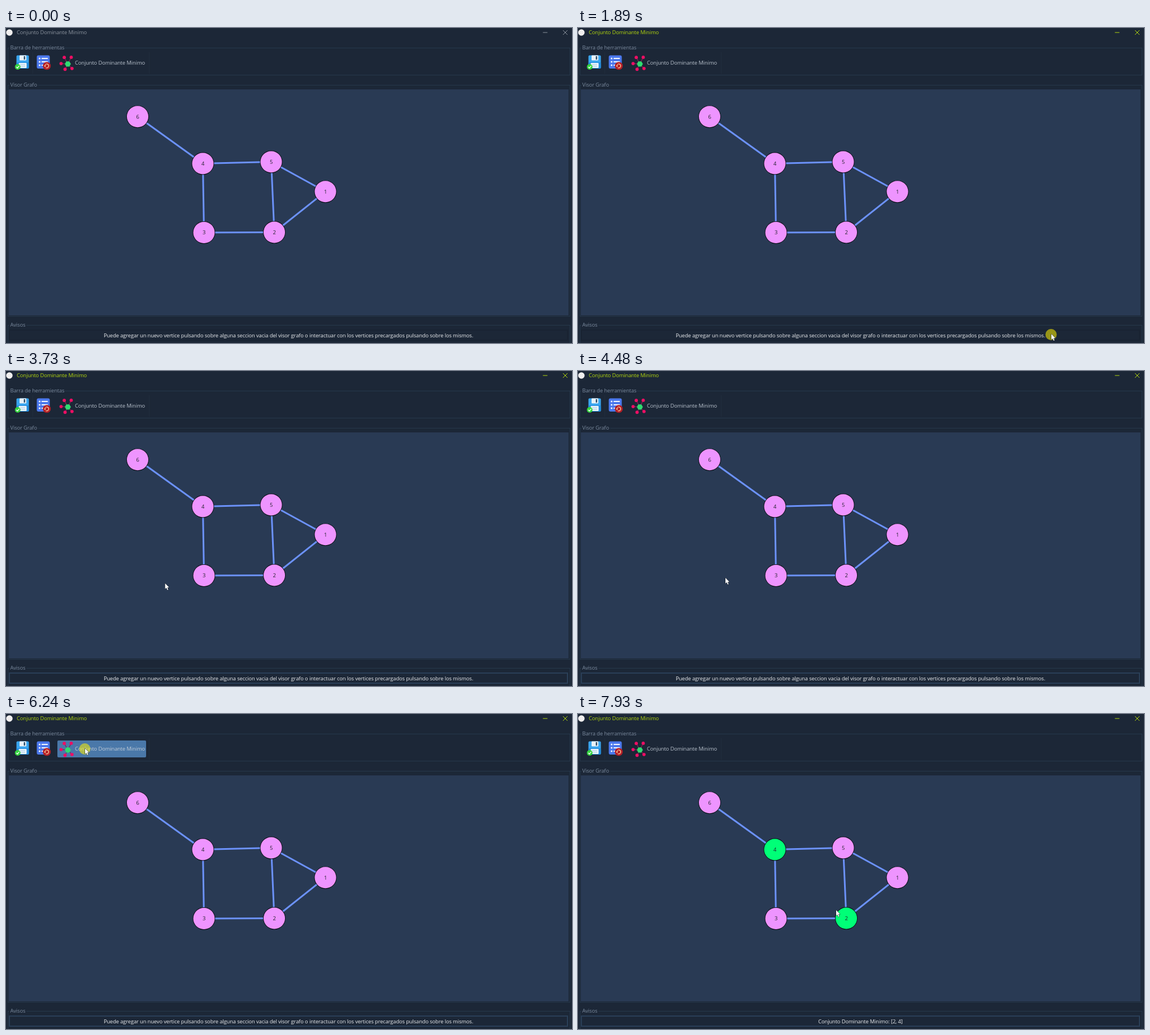
Recreate the animation shown at these times as an HTML page with a canvas. Size 1002 px wide and 559 px high, loop 8 s.

```html
<!DOCTYPE html>
<html lang="es">
<head>
<meta charset="utf-8">
<title>Conjunto Dominante Minimo</title>
<style>
  html, body { margin: 0; width: 100%; height: 100%; overflow: hidden; background: #1c2737; }
  canvas { display: block; width: 1002px; height: 559px; }
</style>
</head>
<body>
<canvas id="stage" width="1002" height="559"></canvas>
<script>
const ctx = document.getElementById('stage').getContext('2d');
const LOOP = 8000, STEP = 70;
const BG = '#1c2737', LINE = '#26384b', LABEL = '#7b8b9f';
const NAME = 'Conjunto Dominante Minimo';
const HINT = 'Puede agregar un nuevo vertice pulsando sobre alguna seccion vacia del visor grafo ' +
  'o interactuar con los vertices precargados pulsando sobre los mismos.';

const nodes = {
  1: [565.5, 290.3], 2: [475, 362.5], 3: [350.5, 363],
  4: [348.5, 240.5], 5: [469.5, 237.5], 6: [233, 157.3]
};
const edges = ['64', '45', '43', '32', '25', '51', '21'];

const home = [797, 566];
const moves = [
  { from: 380, to: 870, end: [618, 281] },
  { from: 1060, to: 1760, end: [838, 543] },
  { from: 2550, to: 3040, end: [211, 532] },
  { from: 3040, to: 3330, end: [206, 543] },
  { from: 3460, to: 3870, end: [352, 222] },
  { from: 4140, to: 4480, end: [261, 367] },
  { from: 4480, to: 4970, end: [206, 391] },
  { from: 4970, to: 5780, end: [140, 61] },
  { from: 6700, to: 6980, end: [352, 189] },
  { from: 6980, to: 7250, end: [341, 241] },
  { from: 7510, to: 7930, end: [457, 348] }
];

const ease = k => k * k * (3 - 2 * k);

function pointerAt(t) {
  let pos = home;
  for (const { from, to, end } of moves) {
    if (t < from) break;
    const held = Math.floor((t - from) / STEP) * STEP;
    const k = t >= to ? 1 : ease(held / (to - from));
    pos = pos.map((p, i) => p + (end[i] - p) * k);
  }
  return pos;
}

function text(str, x, y, color, align = 'left') {
  ctx.font = '9.4px "Open Sans", "Noto Sans", sans-serif';
  ctx.letterSpacing = '-0.13px';
  ctx.textAlign = align;
  ctx.textBaseline = 'alphabetic';
  ctx.fillStyle = color;
  ctx.fillText(str, x, y + 3.3);
}

function poly(points, color, width) {
  ctx.beginPath();
  points.forEach(([x, y]) => ctx.lineTo(x, y));
  if (width) {
    ctx.strokeStyle = color;
    ctx.lineWidth = width;
    ctx.stroke();
  } else {
    ctx.fillStyle = color;
    ctx.fill();
  }
}

const line = (x0, y0, x1, y1, color, width = 1) => poly([[x0, y0], [x1, y1]], color, width);

function disc(x, y, r, color) {
  ctx.beginPath();
  ctx.arc(x, y, r, 0, Math.PI * 2);
  ctx.fillStyle = color;
  ctx.fill();
}

function box(x, y, w, h, r, color) {
  ctx.beginPath();
  ctx.roundRect(x, y, w, h, r);
  ctx.fillStyle = color;
  ctx.fill();
}

function frame(x, y, w, h, color, width = 1) {
  ctx.strokeStyle = color;
  ctx.lineWidth = width;
  ctx.strokeRect(x, y, w, h);
}

// Points spread around a centre, one every `turn` radians
const around = (n, x, y, r, start, turn) => Array.from({ length: n }, (_, i) =>
  [x + r * Math.cos(start + i * turn), y + r * Math.sin(start + i * turn)]);

function group(label, y, h, gap) {
  frame(3.5, y + .5, 995, h, LINE);
  box(6, y - 2, gap, 5, 0, BG);
  text(label, 7.5, y, LABEL);
}

function titleBar(active) {
  const color = active ? '#b4d80d' : '#8b939e';
  disc(6, 8, 5.7, '#f0eeee');
  text(NAME, 19, 8, color);
  line(950.5, 8, 958.5, 8, color);
  line(986, 4, 994, 12, color);
  line(994, 4, 986, 12, color);
}

function saveIcon() {
  box(18.5, 48.5, 22, 23.5, 2, '#39a5ef');
  box(18.5, 61, 22, 11, 2, '#218bdc');
  box(24, 48.5, 12, 9, 1, '#e9f2f8');
  box(31.5, 50, 2.5, 6, 0, '#34526e');
  box(22.5, 62, 14, 9, 1, '#eef5fa');
  for (const y of [65, 68]) line(25, y, 34, y, '#9cc5e5');
  disc(20.7, 69, 5, '#35d33f');
  poly([[18.3, 69], [20.2, 71], [23.4, 67.2]], '#fff', 1.3);
}

function listIcon() {
  box(54.5, 48.5, 23, 23.5, 3, '#4b78ec');
  for (let y = 54; y <= 66; y += 6) {
    disc(59.5, y, 1.5, '#fff');
    line(63, y, 74, y, '#f4f7ff', 2);
  }
  disc(72.2, 67.3, 7, '#b51f27');
  ctx.beginPath();
  ctx.arc(72.2, 67.3, 3.4, -2.6, 2.1);
  ctx.strokeStyle = '#ffd9a0';
  ctx.lineWidth = 1.2;
  ctx.stroke();
  poly([[67.2, 66.5], [71, 66.5], [69, 69.3]], '#ffd9a0');
}

function graphIcon() {
  for (const [x, y] of around(5, 109.5, 62.3, 12, -1.05, -1.08)) {
    line(109.5, 63.8, x, y, '#8b2052', 1.2);
    disc(x, y, 2.9, '#ee0e64');
  }
  poly(around(6, 109.5, 63.8, 5.3, 0, Math.PI / 3), '#2fdc70');
}

function toolbar(hover) {
  group('Barra de herramientas', 35, 48, 97);
  for (const x of [47.5, 253.5]) line(x, 43, x, 81, '#202d3e');
  if (hover) box(91, 47, 157, 30, 2, '#4a78a9');
  saveIcon();
  listIcon();
  graphIcon();
  text(NAME, 122, 62, hover ? '#c3cdd8' : '#b9c2cd');
}

function graph(solved) {
  group('Visor Grafo', 101, 410, 51);
  box(5, 109, 991, 401, 0, '#293a54');
  for (const [a, b] of edges) line(...nodes[a], ...nodes[b], '#6c92fb', 3);
  for (const [id, [x, y]] of Object.entries(nodes)) {
    const chosen = solved && (id === '2' || id === '4');
    disc(x, y, 19.9, '#080a10');
    disc(x, y, 19, chosen ? '#00ff77' : '#ee94ff');
    text(id, x, y, '#20222c', 'center');
  }
}

function notices(focused, solved) {
  group('Avisos', 527, 33, 30);
  frame(6, 536, 988, 18, focused ? '#2a3f58' : '#192332', 2);
  text(solved ? NAME + ': [2, 4]' : HINT, 500, 546, '#e9ebee', 'center');
}

function pointer(x, y, pressed) {
  if (pressed) disc(x - .5, y + 1, 10, 'rgba(255,240,0,.55)');
  const shape = [[0, 0], [0, 10], [2.3, 8], [4, 12], [5.6, 11.3], [4, 7.6], [7, 7.3], [0, 0]]
    .map(([dx, dy]) => [x + dx, y + dy]);
  poly(shape, '#10151d', 1);
  poly(shape, '#fff');
}

function draw(t) {
  const [x, y] = pointerAt(t);
  const within = (a, b) => t >= a && t < b;
  const solved = t >= 6310;
  box(0, 0, 1002, 559, 0, BG);
  titleBar(t >= 1890);
  toolbar(x >= 91 && x < 248 && y >= 47 && y < 77);
  graph(solved);
  notices(t >= 1960, solved);
  pointer(x, y, within(1820, 2160) || within(6240, 6380));
}

const start = performance.now();
function tick() {
  draw((performance.now() - start) % LOOP);
  requestAnimationFrame(tick);
}
tick();
</script>
</body>
</html>
```
